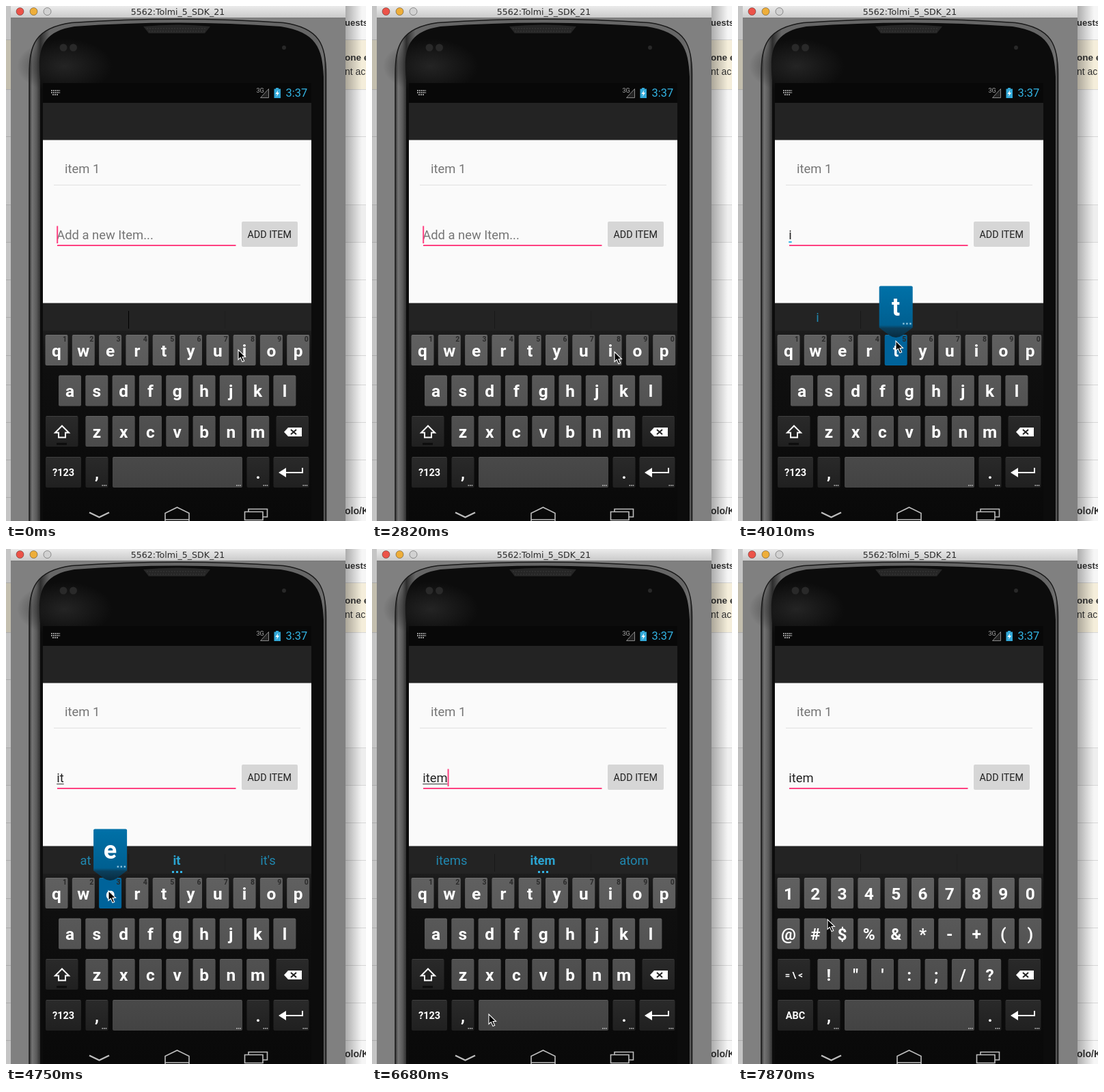
An HTML page for the animation above (8000 ms loop, 527x755 px).

```html
<!DOCTYPE html>
<html lang="en">
<head>
<meta charset="utf-8">
<style>
html, body { margin: 0; width: 100%; height: 100%; overflow: hidden; background: #eee; }
svg { display: block; width: 527px; height: 755px; font-family: Roboto, sans-serif; font-size: 18.4px; }
.key { font-weight: 700; fill: #fff; text-anchor: middle; }
.page { font: 700 14px "Liberation Sans", Arial, sans-serif; fill: #333; }
.nav, .icon { fill: none; stroke: #bdbdbd; stroke-width: 1.6; }
.icon { stroke: #fff; stroke-width: 2; }
</style>
</head>
<body>
<svg viewBox="0 0 527 755">
  <defs>
    <linearGradient id="bar" x2="0" y2="1"><stop stop-color="#ebebeb"/><stop offset="1" stop-color="#c9c9c9"/></linearGradient>
    <linearGradient id="shade"><stop stop-color="#000" stop-opacity=".3"/><stop offset="1" stop-color="#000" stop-opacity="0"/></linearGradient>
    <linearGradient id="rim" gradientUnits="userSpaceOnUse" x1="33" x2="469">
      <stop stop-color="#222"/><stop offset=".012" stop-color="#747474"/><stop offset=".026" stop-color="#5c5c5c"/>
      <stop offset=".04" stop-color="#2e2e2e"/><stop offset=".07" stop-color="#666"/><stop offset=".97" stop-color="#666"/>
      <stop offset=".99" stop-color="#707070"/><stop offset="1" stop-color="#222"/>
    </linearGradient>
    <radialGradient id="glow"><stop stop-color="#242424"/><stop offset="1" stop-color="#242424" stop-opacity="0"/></radialGradient>
    <linearGradient id="board" x2="0" y2="1"><stop stop-color="#1d1d1d"/><stop offset=".2" stop-color="#0f0f0f"/><stop offset="1" stop-color="#090909"/></linearGradient>
    <linearGradient id="cap" gradientUnits="userSpaceOnUse" x1="0" y1="482" x2="0" y2="706"><stop stop-color="#606060"/><stop offset="1" stop-color="#434343"/></linearGradient>
    <linearGradient id="dark" x2="0" y2="1"><stop stop-color="#2a2a2a"/><stop offset="1" stop-color="#202020"/></linearGradient>
    <linearGradient id="blue" x2="0" y2="1"><stop stop-color="#0071a8"/><stop offset=".76" stop-color="#005f90"/><stop offset=".82" stop-color="#0b3f5c"/><stop offset="1" stop-color="#082c40"/></linearGradient>
  </defs>

  <!-- page behind the window -->
  <rect width="527" height="755" fill="#f6f6f6"/>
  <path d="M0 50H527V122H0Z" fill="#f5eedb"/>
  <path d="M0 291H527V346H0Z" fill="#eee"/>
  <path d="M0 49.5H527M0 122.5H527M0 191.5H527M0 291.5H527M0 346.5H527M0 401.5H527M0 456.5H527M0 512.5H527M0 555.5H527M0 610.5H527M0 665.5H527M0 720.5H527" stroke="#d6d6d6"/>
  <g class="page">
    <text x="496" y="29" font-size="13">uests</text>
    <text x="496" y="80" font-size="13.5">one e</text>
    <text x="496" y="101" font-weight="400">nt ac</text>
    <text x="496" y="745">olo/K</text>
  </g>
  <path d="M497 0H521V755H497Z" fill="url(#shade)"/>
  <path d="M0 0H7V755H0Z" fill="#000" opacity=".2"/>

  <!-- window -->
  <path d="M7 0H497V755H7Z" fill="#808080"/>
  <path d="M7 0H497V17.5H7Z" fill="url(#bar)"/>
  <path d="M7 17.5H497" stroke="#777"/>
  <g stroke-opacity=".35" stroke="#000">
    <circle cx="20.5" cy="8" r="5.5" fill="#ec5349"/>
    <circle cx="40.5" cy="8" r="5.5" fill="#eeae3a"/>
    <circle cx="60.5" cy="8" r="5.5" fill="#d2d2d2"/>
  </g>
  <text x="251.5" y="12.5" text-anchor="middle" font-size="12.6" style="font-family:'DejaVu Sans',sans-serif" fill="#2a2a2a">5562:Tolmi_5_SDK_21</text>

  <!-- phone -->
  <path d="M34 760V100C34 58 42 32 96 24.500Q250 14 406 24.500C460 32 468.500 58 468.500 100V760" fill="url(#rim)" stroke="#1a1a1a" stroke-width="1.500"/>
  <path d="M50 760V108C46 66 50 38 100 30Q250 19 402 30C454 38 463.500 62 465 104V760Z" fill="#0c0c0c"/>
  <ellipse cx="86" cy="88" rx="70" ry="40" fill="url(#glow)"/>
  <path d="M201 30Q250 25 299 30L291 40H209Z" fill="#262626"/>
  <path d="M206 33H294M209 37H291" stroke="#3a3a3a" stroke-dasharray="2 2"/>
  <g fill="#292929"><circle cx="84" cy="61" r="5.5"/><circle cx="98.5" cy="61" r="5.5"/><circle cx="407" cy="61" r="3"/></g>

  <!-- status bar -->
  <path d="M54 113H447V755H54Z" fill="#080808"/>
  <path d="M66 124H79M66 127H79M68 130H77" stroke="#999" stroke-width="2" stroke-dasharray="2 1"/>
  <text x="366.5" y="126.5" font-size="9" fill="#aaa">3G</text>
  <path d="M372.5 134.5H384.5V121.5Z" fill="#222" stroke="#888"/>
  <path d="M392.5 121.5H395V120H399V121.5H402V135H392.5Z" fill="#33a9d8"/>
  <path d="M398.5 123L394.5 129H397L396 133L400 127H397.5Z" fill="#fff"/>
  <text x="409.5" y="133" font-size="16.4" fill="#33b5e5">3:37</text>

  <!-- app -->
  <path d="M54 142H447V197H54Z" fill="#232323"/>
  <path d="M54 435H447V476H54Z" fill="#232323"/>
  <path d="M54 196.5H447V435.5H54Z" fill="#fafafa"/>
  <text x="86" y="245" fill="#757575">item 1</text>
  <path d="M70 262.5H431" stroke="#e0e0e0"/>
  <path d="M75 351H336.5" stroke="#ff4081" stroke-width="2"/>
  <rect x="345" y="316" width="82" height="37" rx="2" fill="#d6d6d6"/>
  <text x="353.5" y="340" font-size="14.3" fill="#212121">ADD ITEM</text>
  <g id="field"></g>

  <!-- keyboard -->
  <path d="M54 476H447V755H54Z" fill="url(#board)"/>
  <g id="keys"></g>
  <g class="nav" transform="translate(0 1)">
    <path d="M122 741.5L136.5 748.5L151 741.5" stroke-width="2.4"/>
    <path d="M233 757V742.500L250.5 734L268 742.500V757M233 752H268"/>
    <path d="M349.5 740.5H376V752.5H349.5ZM355 740V736.5H382.5V748H376"/>
  </g>
  <g id="popup"></g>
  <path id="pointer" d="M0 0V14.5L3.3 11.4L6 17.5L8.7 16.4L6 10.5H10.5Z" fill="#000" stroke="#fff" stroke-width="1.1"/>
</svg>
<script>
const STEP = 148.5, LOOP = 8000;
const $ = id => document.getElementById(id);
const pen = document.createElement('canvas').getContext('2d');
const esc = s => s.replace(/&/g, '&amp;').replace(/</g, '&lt;');

// pointer stops: step, x, y
const path = [[0, 340, 504], [2, 340, 504], [9, 171, 355], [11, 171, 355], [17, 363, 508], [19, 355, 507],
  [23, 355, 507], [26, 231, 491], [28, 231, 491], [31, 150, 501], [33, 150, 501], [35, 360, 609],
  [38, 360, 609], [42, 200, 676], [45, 171, 682], [48, 171, 682], [50, 82, 678], [51, 82, 678],
  [52, 96, 645], [53, 131, 543], [54, 131, 543]];

// key held from one step up to another, when its letter appears
const presses = [['i', 21, 23], ['t', 26, 28], ['e', 31, 33], ['m', 36, 38], [' ', 47, 48], ['?123', 51, 52]];

const hints = { i: ['i', 'I', ''], it: ['at', 'it', "it's"], ite: ['ite', 'item', 'items'], item: ['items', 'item', 'atom'] };
const letters = { rows: ['qwertyuiop', 'asdfghjkl', 'zxcvbnm'], shift: '', mode: '?123' };
const symbols = { rows: ['1234567890', '@#$%&*-+()', '!"\':;/?'], shift: '= \\ <', mode: 'ABC' };

function pointerAt(n) {
  const i = path.findIndex(p => p[0] > n);
  const a = path[i - 1], b = path[i];
  const u = (n - a[0]) / (b[0] - a[0]), e = u * u * (3 - 2 * u);
  return [a[1] + (b[1] - a[1]) * e, a[2] + (b[2] - a[2]) * e];
}

const dots = (x, y, size, gap, color) => [0, 1, 2].map(i =>
  `<rect x="${x + i * gap}" y="${y}" width="${size}" height="${size}" fill="${color}"/>`).join('');

function key(x, y, w, label, held, { size = 24.5, dark = false, more = false } = {}) {
  const fill = held === label && label ? '#00639a' : `url(#${dark ? 'dark' : 'cap'})`;
  return `<rect x="${x}" y="${y}" width="${w}" height="45" rx="2" fill="${fill}"/>` +
    `<path d="M${x + 1} ${y + .5}h${w - 2}" stroke="#fff" opacity=".1"/>` +
    `<text class="key" x="${x + w / 2}" y="${Math.round(y + 23 + size * .36)}" font-size="${size}">${esc(label)}</text>` +
    (more ? dots(x + w - 9, y + 41, 1.6, 2.6, '#bbb') : '');
}

function popup(label, x, y) {
  const cx = x + 16.5, top = y - 71.5;
  return `<path d="M${cx - 24.5} ${top + 2}q0 -2 2 -2h45q2 0 2 2V${top + 61}L${cx + 10} ${top + 72}Q${cx} ${top + 79} ${cx - 10} ${top + 72}L${cx - 24.5} ${top + 61}Z" fill="url(#blue)"/>` +
    `<text class="key" x="${cx}" y="${top + 43}" font-size="36">${label}</text>` +
    dots(cx + 10, top + 54, 2.4, 5, '#8fc4dd');
}

function keyboard(n, text, held) {
  const set = n < 52 ? letters : symbols;
  let out = `<path d="M179.5 447V473" stroke="${n < 3 ? '#000' : '#191919'}"/><path d="M320.5 447V473" stroke="#1e1e1e"/>`;
  let pop = '';
  (hints[text] || []).forEach((word, i) => {
    const mid = i === 1;
    out += `<text x="${116.5 + i * 133.5}" y="463" text-anchor="middle" fill="${mid ? '#2ba3d0' : '#2088b0'}" font-weight="${mid ? 700 : 400}">${word}</text>`;
  });
  if (text.length > 1 && hints[text]) out += dots(243, 472, 3, 6, '#33b5e5');

  set.rows.forEach((row, r) => {
    const y = 482 + r * 59.5;
    const left = row.length === 10 ? 57.5 : row.length === 9 ? 77 : 116.4;
    [...row].forEach((c, i) => {
      const x = left + i * 39.3;
      out += key(x, y, 33, c, held);
      if (r === 0 && set === letters)
        out += `<text x="${x + 31.5}" y="492" text-anchor="end" font-size="10.5" font-weight="700" fill="#2b2b2b">${(i + 1) % 10}</text>`;
      if (c === held) pop = popup(c, x, y);
    });
  });

  out += key(58, 601, 47.5, set.shift, held, { size: 13, dark: true });
  if (set === letters)
    out += '<path class="icon" d="M82 615.5L92 625.5H87V632.5H77V625.5H72Z"/><path d="M74 642H89" stroke="#0c0c0c" stroke-width="3"/>';
  out += key(395.5, 601, 47.5, '', held, { dark: true }) +
    '<path d="M407 624.5L413 618H433V631H413Z" fill="#fff"/><path d="M417 621L425 628M425 621L417 628" stroke="#222" stroke-width="2"/>';
  out += key(58, 661, 52, set.mode, held, { size: 14.5, dark: true }) +
    key(116.5, 661, 33, ',', held, { dark: true, more: true }) +
    key(156, 661, 190, ' ', held, { more: true }) +
    key(352.5, 661, 33, '.', held, { dark: true, more: true }) +
    key(391.5, 661, 52, '', held, { dark: true, more: true }) +
    '<path d="M399 684L410 677V691Z" fill="#fff"/><path class="icon" d="M409 684H434V677"/>';
  $('keys').innerHTML = out;
  $('popup').innerHTML = pop;
}

function field(n, text, typedAt) {
  const x = 74.2;
  pen.font = '18.4px Roboto, sans-serif';
  const w = pen.measureText(text).width;
  let out = `<text x="${x}" y="342" fill="${text ? '#212121' : '#757575'}">${text || 'Add a new Item...'}</text>`;
  if (text && !text.endsWith(' '))
    out += text.length === 1
      ? `<rect x="${x}" y="345" width="${w}" height="2" fill="#33b5e5"/>`
      : `<rect x="${x}" y="344" width="${w}" height="1" fill="#333"/>`;
  if (Math.floor((n * STEP - typedAt) / 500) % 2 === 0)
    out += `<rect x="${x + w}" y="322.5" width="2" height="25.5" fill="#ff4081"/>`;
  $('field').innerHTML = out;
}

let shown = -1;
function draw(now) {
  const n = Math.floor((now % LOOP + 5) / STEP);
  if (n === shown) return;
  shown = n;
  const done = presses.filter(p => p[0].length === 1 && n >= p[2]);
  const text = done.map(p => p[0]).join('');
  const held = (presses.find(p => n >= p[1] && n < p[2]) || [])[0];
  const typedAt = done.length ? done[done.length - 1][2] * STEP : -360;
  field(n, text, typedAt);
  keyboard(n, text, held);
  $('pointer').setAttribute('transform', `translate(${pointerAt(n)})`);
}

const start = performance.now();
function tick() {
  draw(performance.now() - start);
  requestAnimationFrame(tick);
}
tick();
</script>
</body>
</html>
```
